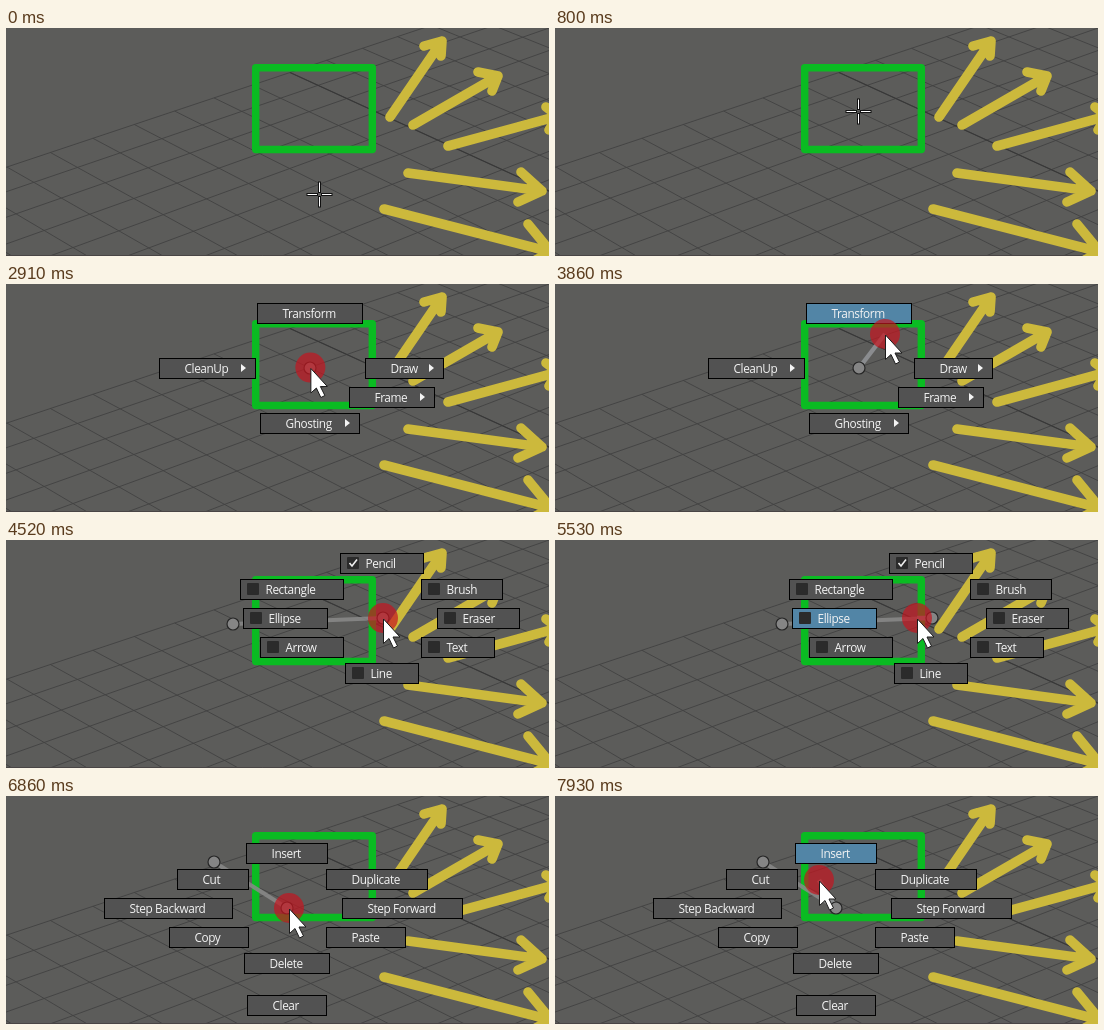
Recreate the animation shown at these times as an HTML page. Size 543 by 228 pixels, loop 7.99 s.

```html
<!DOCTYPE html>
<html lang="en">
<head>
<meta charset="utf-8">
<title>Marking menu</title>
<style>
  html, body { margin: 0; width: 100%; height: 100%; overflow: hidden; background: #5c5c5a; }
  svg { display: block; width: 543px; height: 228px; }
  text { font: 11.8px "Open Sans", "Noto Sans", sans-serif; letter-spacing: -0.4px; fill: #f4f4f4; }
</style>
</head>
<body>
<svg id="stage" viewBox="0 0 543 228"></svg>
<script>
const LOOP = 7990;
const stage = document.getElementById('stage');

function add(parent, tag, attrs = {}, text) {
  const node = document.createElementNS('http://www.w3.org/2000/svg', tag);
  set(node, attrs);
  if (text) node.textContent = text;
  parent.appendChild(node);
  return node;
}
function set(node, attrs) {
  for (const key in attrs) node.setAttribute(key, attrs[key]);
}
function show(node, on) {
  node.style.display = on ? '' : 'none';
}
function place(node, x, y) {
  set(node, { transform: `translate(${x.toFixed(2)} ${y.toFixed(2)})` });
}

// Ground grid: a plane with two vanishing points on one horizon; u = 0 is the axis
function gridPoint(u, v) {
  const a = u * 0.0119, b = -v * 0.0122, w = 1 + a + b;
  const x = (284 + a * 3400 - b * 1990) / w;
  const y = (44.5 - (a + b) * 996) / w;
  return x.toFixed(1) + ' ' + y.toFixed(1);
}
function drawGrid() {
  let d = '';
  for (let u = -12; u <= 12; u++) d += `M${gridPoint(u, 0)}L${gridPoint(u, 24)}`;
  for (let v = 0; v <= 24; v++) d += `M${gridPoint(-12, v)}L${gridPoint(12, v)}`;
  add(stage, 'path', { d, fill: 'none', stroke: '#424242', 'stroke-width': 0.9 });
  add(stage, 'path', {
    d: `M${gridPoint(0, 0)}L${gridPoint(0, 24)}`, stroke: '#383838', 'stroke-width': 1.2
  });
  add(stage, 'path', { d: 'M0 227.5H543', stroke: '#494545' });
}

function drawSketch() {
  add(stage, 'rect', {
    x: 249.7, y: 39.7, width: 116.6, height: 81.8, fill: 'none',
    stroke: '#0abb22', 'stroke-width': 7.4, 'stroke-linejoin': 'round'
  });
  const arrows = [
    'M384 89L436 13M418 18L436 13L435 28',
    'M407 97L492 48M472 44L492 48L486 63',
    'M442 118L552 88M540 79L552 88L543 102',
    'M402 145L536 163M515 144L536 163L512 174',
    'M378 181L545 224M522 196L545 224L524 235'
  ];
  add(stage, 'path', {
    d: arrows.join(''), fill: 'none', stroke: '#ccb93c', 'stroke-width': 9.6,
    'stroke-linecap': 'round', 'stroke-linejoin': 'round'
  });
}

drawGrid();
drawSketch();

const oldLine = add(stage, 'line', {
  stroke: '#8a8a8a', 'stroke-width': 4, 'stroke-opacity': 0.85
});
const oldDot = makeDot();

// Each item: label, left, top, width
const menus = {
  main: makeMenu([
    ['Transform', 251, 19, 106], ['CleanUp', 153, 74, 97], ['Draw', 359, 74, 79],
    ['Frame', 343, 103, 86], ['Ghosting', 254, 129, 100]
  ], (g, label, x, y, w) => {
    if (label === 'Transform') return;
    add(g, 'path', { d: `M${x + w - 15} ${y + 6}l5 4l-5 4z`, fill: '#f4f4f4' });
  }),
  draw: makeMenu([
    ['Pencil', 334, 13, 84], ['Brush', 415, 39, 82], ['Eraser', 431, 68, 83],
    ['Text', 415, 97, 74], ['Line', 339, 123, 74], ['Arrow', 254, 97, 84],
    ['Ellipse', 237, 68, 85], ['Rectangle', 234, 39, 104]
  ], (g, label, x, y) => {
    add(g, 'rect', { x: x + 7, y: y + 4, width: 12, height: 12, rx: 1, fill: '#2b2b2b' });
    if (label !== 'Pencil') return;
    add(g, 'path', {
      d: `M${x + 9.5} ${y + 10}l2.5 3l5 -6.5`, fill: 'none', stroke: '#eeeeee', 'stroke-width': 1.6
    });
  }),
  frame: makeMenu([
    ['Insert', 240, 47, 82], ['Duplicate', 320, 73, 102], ['Step Forward', 336, 102, 121],
    ['Paste', 320, 131, 80], ['Delete', 238, 157, 86], ['Clear', 241, 199, 80],
    ['Copy', 163, 131, 80], ['Step Backward', 98, 102, 129], ['Cut', 171, 73, 72]
  ])
};

function makeMenu(items, mark) {
  const g = add(stage, 'g');
  const boxes = items.map(([label, x, y, w]) => {
    const rect = add(g, 'rect', {
      x: x + 0.5, y: y + 0.5, width: w - 1, height: 20, stroke: '#000000'
    });
    if (mark) mark(g, label, x, y, w);
    add(g, 'text', { x: x + 25.5, y: y + 15 }, label);
    return { rect, x: x + w / 2, y: y + 10.5 };
  });
  return { g, boxes };
}
function makeDot() {
  return add(stage, 'circle', { r: 6, fill: '#858585', stroke: '#262626', 'stroke-width': 1.2 });
}

const line = add(stage, 'line', {
  stroke: '#8f9295', 'stroke-width': 4.5, 'stroke-opacity': 0.9
});
const dot = makeDot();

const pointer = add(stage, 'g');
add(pointer, 'circle', { r: 15, fill: '#c4161f', 'fill-opacity': 0.7 });
add(pointer, 'path', {
  d: 'M0.5 1V25.5L6 20.5L10.5 30L14.5 28L10 19H17Z',
  fill: '#ffffff', stroke: '#1c1c1c', 'stroke-width': 1
});

const cross = add(stage, 'g');
add(cross, 'path', {
  d: 'M-12.5 .5H-1M2 .5H13.5M.5 -12.5V-1M.5 2V13.5', stroke: '#111111', 'stroke-width': 3
});
add(cross, 'path', {
  d: 'M-11.5 .5H-2M3 .5H12.5M.5 -11.5V-2M.5 3V12.5', stroke: '#ffffff', 'stroke-width': 1
});

// Cursor keys: time, x, y; two keys at one time make a jump
const path = [
  [0, 313, 166], [30, 313, 166], [220, 270, 215], [420, 303, 83],
  [2000, 303, 83], [2000, 304, 84], [2880, 304, 84], [3320, 330, 50],
  [3860, 330, 50], [4000, 318, 66], [4450, 454, 78], [4450, 377, 78],
  [5430, 377, 78], [5940, 230, 78], [6010, 227, 84], [6580, 227, 84],
  [6850, 302, 130], [6850, 283, 112], [7330, 283, 112], [7400, 282, 112],
  [7600, 282, 112], [7930, 264, 84], [LOOP, 264, 84]
];

const phases = [
  { at: 2000, menu: 'main', shift: 0, origin: [304, 84] },
  { at: 4450, menu: 'draw', shift: 0, origin: [377, 78], from: [227, 84] },
  { at: 6010, menu: 'main', shift: -77, origin: [227, 84] },
  { at: 6850, menu: 'frame', shift: 0, origin: [281, 112], from: [208, 66] }
];

function cursorAt(t) {
  let i = 0;
  while (i < path.length - 2 && path[i + 1][0] <= t) i++;
  const [t0, x0, y0] = path[i], [t1, x1, y1] = path[i + 1];
  const p = Math.min(1, (t - t0) / (t1 - t0));
  const k = p * p * (3 - 2 * p);
  return [x0 + (x1 - x0) * k, y0 + (y1 - y0) * k];
}

// The item whose direction is nearest to the drag
function pick(boxes, [ox, oy], dx, dy) {
  if (Math.hypot(dx, dy) < 12) return null;
  const cosine = b => {
    const bx = b.x - ox, by = b.y - oy;
    return (bx * dx + by * dy) / Math.hypot(bx, by);
  };
  return boxes.reduce((best, b) => cosine(b) > cosine(best) ? b : best);
}

function setLine(node, [x1, y1], [x2, y2]) {
  set(node, { x1, y1, x2, y2 });
}

function render(t) {
  const [x, y] = cursorAt(t);
  const phase = phases.filter(p => p.at <= t).pop();
  const from = phase && phase.from;
  show(cross, !phase);
  for (const node of [pointer, line, dot]) show(node, phase);
  for (const node of [oldLine, oldDot]) show(node, from);
  for (const name in menus) show(menus[name].g, phase && phase.menu === name);
  if (!phase) {
    place(cross, Math.round(x), Math.round(y));
    return;
  }
  const { origin, shift } = phase;
  const { g, boxes } = menus[phase.menu];
  place(g, shift, 0);
  const hot = pick(boxes, [origin[0] - shift, origin[1]], x - origin[0], y - origin[1]);
  for (const b of boxes) set(b.rect, { fill: b === hot ? '#5285a6' : '#525252' });
  setLine(line, origin, [x, y]);
  place(dot, ...origin);
  if (from) {
    setLine(oldLine, from, origin);
    place(oldDot, ...from);
  }
  place(pointer, x, y);
}

const start = performance.now();
function tick() {
  render((performance.now() - start) % LOOP);
  requestAnimationFrame(tick);
}
render(0);
requestAnimationFrame(tick);
</script>
</body>
</html>
```
